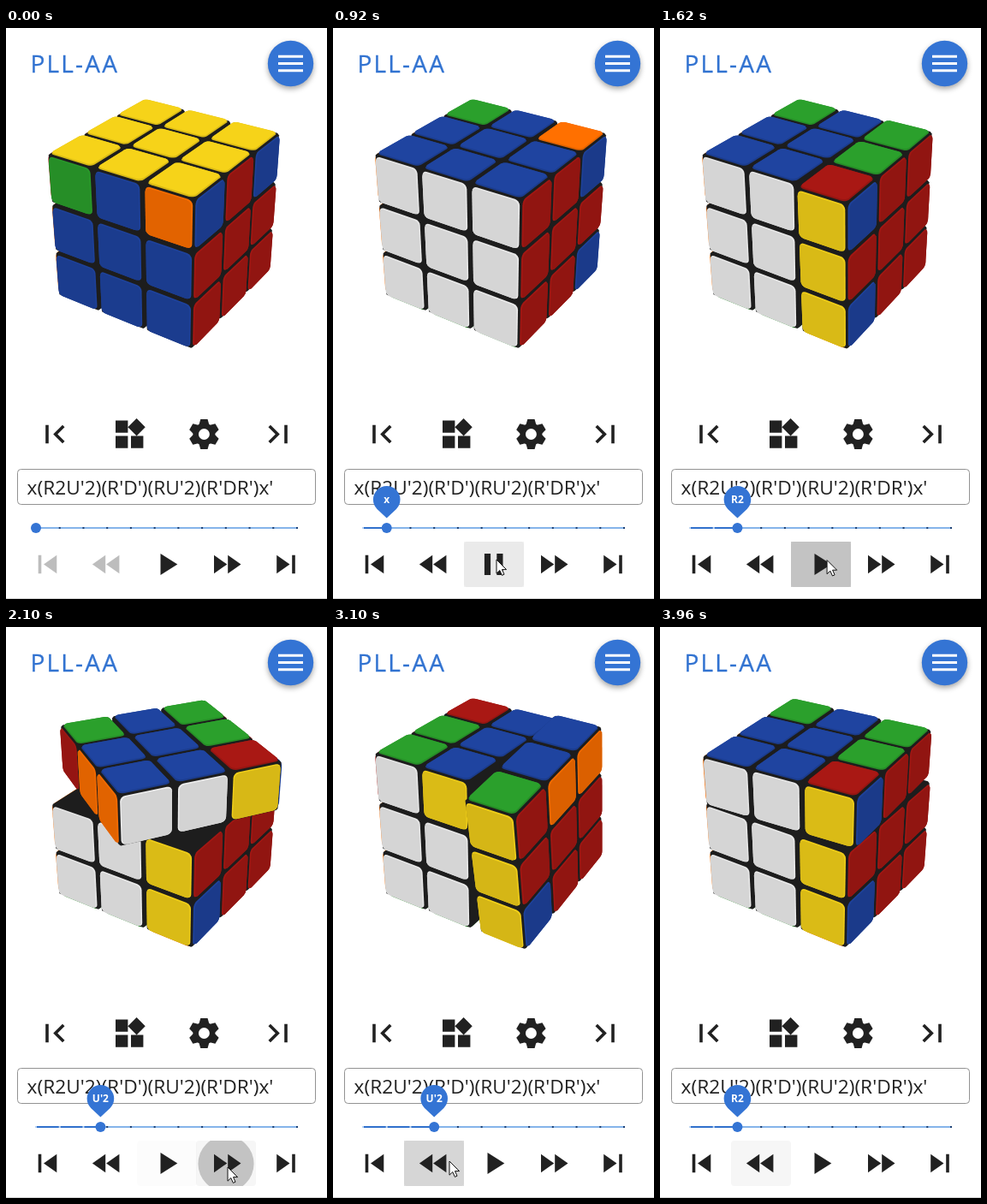
These frames come from a looping animation (375x667 px, 4.05 s). An HTML page with a canvas:

```html
<!DOCTYPE html>
<html lang="en">
<head>
<meta charset="utf-8">
<title>PLL-AA</title>
<style>
html, body { margin: 0; width: 100%; height: 100%; overflow: hidden; background: #fff; }
canvas, svg.ui { position: absolute; left: 0; top: 0; }
text { font-family: "Open Sans", "Noto Sans", sans-serif; }
.menu { filter: drop-shadow(0 3px 3px rgba(0, 0, 0, .35)); }
</style>
</head>
<body>
<canvas id="cube" width="375" height="430"></canvas>
<svg class="ui" width="375" height="667" viewBox="0 0 375 667" fill="#212121">
  <text x="28.5" y="52" font-size="28" letter-spacing="2.2" fill="#3273d1" stroke="#3273d1" stroke-width=".3">PLL-AA</text>
  <circle class="menu" cx="332.5" cy="41.5" r="26.7" fill="#3474d4"/>
  <path d="M318 33.2h29M318 41.5h29M318 49.8h29" stroke="#fff" stroke-width="3.1"/>

  <g transform="translate(57 474.5) scale(1.8) translate(-12 -12)">
    <path d="M18.4 16.6 13.8 12l4.6-4.6L17 6l-6 6 6 6zM6 6h2v12H6z"/>
  </g>
  <g transform="translate(144.2 474.6) scale(1.8) translate(-12 -12)">
    <path d="M13 13h8v8h-8zM3 13h8v8H3zM3 3h8v8H3zM16.66 1.7 22.3 7.34 16.66 13 11 7.34z"/>
  </g>
  <g id="gear" transform="translate(231.4 474.5) scale(1.8)">
    <circle r="5.4" fill="none" stroke="#212121" stroke-width="3.6"/>
  </g>
  <g transform="translate(318 474.5) scale(1.8) translate(-12 -12)">
    <path d="M5.6 7.4 10.2 12l-4.6 4.6L7 18l6-6-6-6zM16 6h2v12h-2z"/>
  </g>

  <rect x="13.5" y="515.5" width="348" height="41" rx="4" fill="none" stroke="#929292"/>
  <text x="24.6" y="544.7" font-size="22.7">x(R2U'2)(R'D')(RU'2)(R'DR')x'</text>

  <path d="M35 584H341" stroke="#85b4ea" stroke-width="2"/>
  <path id="track" stroke="#2f70cc" stroke-width="2"/>
  <g id="ticks"></g>
  <g id="thumb">
    <circle cy="584" r="6" fill="#3474d4"/>
    <g id="label">
      <path d="M0 572.5 -11.2 562A15.8 15.8 0 1 1 11.2 562Z" fill="#3474d4"/>
      <text id="name" y="554.8" font-size="12" font-weight="700" text-anchor="middle" fill="#fff"></text>
    </g>
  </g>

  <g id="glow"></g>
  <g class="back" transform="translate(48.5 626.5) scale(1.8) translate(-12 -12)">
    <path d="M6 6h2v12H6zM9.5 12l8.5 6V6z"/>
  </g>
  <g class="back" transform="translate(118 626.5) scale(1.8) translate(-12 -12)">
    <path d="M11 18V6l-8.5 6zM11.5 12l8.5 6V6z"/>
  </g>
  <g transform="translate(187.7 626.5) scale(1.8) translate(-12 -12)"><path id="play"/></g>
  <g transform="translate(257.4 626.5) scale(1.8) translate(-12 -12)">
    <path d="M4 18l8.5-6L4 6zM13 6v12l8.5-6z"/>
  </g>
  <g transform="translate(327 626.5) scale(1.8) translate(-12 -12)">
    <path d="M6 18l8.5-6L6 6zM16 6v12h2V6z"/>
  </g>
  <path d="M0 666.5H375" stroke="#d6d6d6"/>
  <path id="cursor" d="M0 0V16.2L3.8 12.6 6.4 18.4 9 17.2 6.5 11.6H11.6Z" fill="#fff" stroke="#111"/>
</svg>
<script>
const LOOP = 4050;
const $ = id => document.getElementById(id);
const clamp = v => Math.max(0, Math.min(1, v));
const mix = (a, b, k) => a + (b - a) * k;
const RAD = Math.PI / 180;

// ---- timeline ----
const easeOut = (t, start, length) => 1 - (1 - clamp((t - start) / length)) ** 3;
const QUARTER = 375, HALF = 750, SKIP = 2515;
const moves = [
  { axis: 0, turn: -90, all: true, at: t => easeOut(t, 575, QUARTER) },
  { axis: 0, turn: -180, at: t => easeOut(t, 1038, HALF) },
  { axis: 1, turn: 180, at: t => t < SKIP ? easeOut(t, 2012, HALF) : 1 - easeOut(t, 3410, HALF) },
  { axis: 0, turn: 90, at: t => easeOut(t, SKIP, QUARTER) - easeOut(t, 2895, QUARTER) }
];
const steps = [[0, 0], [575, 1], [1038, 2], [2012, 3], [2470, 4], [2880, 3], [3410, 2]];
const names = ["", "x", "R2", "U'2", "R'"];
const presses = [[545, 1], [1480, 1], [2018, 2], [2420, 2], [2850, 0], [3370, 0]];
const pointer = [
  [70, 226, 646], [390, 179, 610], [530, 179, 610], [610, 191, 621], [1600, 191, 621],
  [1950, 259, 631], [2500, 259, 631], [2630, 184, 628], [2720, 136, 624],
  [3520, 136, 624], [3720, 150, 668]
];

// cubic-bezier(.4, 0, .2, 1)
function standard(x) {
  let lo = 0, hi = 1;
  for (let i = 0; i < 18; i++) {
    const s = (lo + hi) / 2, r = 1 - s;
    if (1.2 * r * r * s + .6 * r * s * s + s ** 3 < x) lo = s; else hi = s;
  }
  return lo * lo * (3 - 2 * lo);
}

// ---- cube ----
const ctx = $("cube").getContext("2d");
const view = { az: 33 * RAD, el: 30 * RAD, dist: 10.4, focal: 988, x: 187.5, y: 219.6 };
const [sa, ca, se, ce] = [Math.sin(view.az), Math.cos(view.az), Math.sin(view.el), Math.cos(view.el)];
const eye = [sa * ce, se, ca * ce].map(v => v * view.dist);
const paint = {
  yellow: [246, 211, 25], blue: [31, 68, 160], red: [169, 24, 20],
  orange: [255, 112, 0], green: [43, 160, 44], white: [241, 241, 241]
};
const solved = [["orange", "red"], ["white", "yellow"], ["green", "blue"]];
// stickers of the three displaced corners, by position and axis
const swapped = {
  "-1,1,1": { 0: "red", 2: "green" },
  "1,1,1": { 0: "blue", 2: "orange" },
  "1,1,-1": { 0: "blue", 2: "red" }
};

const range = [-1, 0, 1];
const cubies = [];
for (const x of range) for (const y of range) for (const z of range) {
  const pos = [x, y, z], stickers = [];
  pos.forEach((v, axis) => {
    if (!v) return;
    const normal = [0, 0, 0];
    normal[axis] = v;
    const color = (swapped[pos] || {})[axis] || solved[axis][v > 0 ? 1 : 0];
    stickers.push({ normal, color });
  });
  cubies.push({ pos, stickers });
}

function rotate(v, axis, angle) {
  const i = (axis + 1) % 3, j = (axis + 2) % 3, out = [...v];
  const c = Math.cos(angle), s = Math.sin(angle);
  out[i] = c * v[i] - s * v[j];
  out[j] = s * v[i] + c * v[j];
  return out;
}
const add = (a, b, k = 1) => a.map((v, i) => v + b[i] * k);
const dot = (a, b) => a.reduce((sum, v, i) => sum + v * b[i], 0);

function project([x, y, z]) {
  const flat = x * sa + z * ca;
  const scale = view.focal / (view.dist - flat * ce - y * se);
  return [view.x + (x * ca - z * sa) * scale, view.y - (y * ce - flat * se) * scale];
}

function hull(points) {
  const sorted = [...points].sort((a, b) => a[0] - b[0] || a[1] - b[1]);
  const half = list => {
    const out = [];
    for (const p of list) {
      while (out.length > 1) {
        const [a, b] = out.slice(-2);
        if ((b[0] - a[0]) * (p[1] - a[1]) - (b[1] - a[1]) * (p[0] - a[0]) > 0) break;
        out.pop();
      }
      out.push(p);
    }
    return out.slice(0, -1);
  };
  return [...half(sorted), ...half(sorted.reverse())];
}

function fill(points, color) {
  ctx.fillStyle = color;
  ctx.beginPath();
  points.forEach(p => ctx.lineTo(...p));
  ctx.fill();
}

// half a cell, and the body that sits a little inside it
const CELL = 1 / 3, BODY = .318, BEVEL = .022;
const body = [];
for (const axis of [0, 1, 2]) for (const a of [-1, 1]) for (const b of [-1, 1]) for (const c of [-1, 1]) {
  const p = [a, b, c].map(v => v * (BODY - BEVEL));
  p[axis] = [a, b, c][axis] * BODY;
  body.push(p);
}

function outline(normal, half, height) {
  const axis = normal.findIndex(v => v), radius = .06, points = [];
  for (let k = 0; k < 20; k++) {
    const corner = Math.floor(k / 5);
    const a = (corner + (k % 5) / 4) * Math.PI / 2;
    const mid = (corner + .5) * Math.PI / 2;
    const p = normal.map(v => v * height);
    p[(axis + 1) % 3] = Math.sign(Math.cos(mid)) * (half - radius) + Math.cos(a) * radius;
    p[(axis + 2) % 3] = Math.sign(Math.sin(mid)) * (half - radius) + Math.sin(a) * radius;
    points.push(p);
  }
  return points;
}

function shade(color, n) {
  const light = .86 + .14 * n[1] + .025 * n[2];
  return `rgb(${paint[color].map(v => Math.min(255, Math.round(v * light)))})`;
}

// direction of the sticker rim that faces the eye
function rimNormal(n, gaze) {
  const flat = add(gaze, n, -dot(gaze, n));
  const length = Math.hypot(...flat);
  return flat.map(v => v / length);
}

function drawCubie({ pos, stickers, spin }) {
  const center = pos.map(v => v * 2 * CELL);
  const place = p => project(spin(add(center, p)));
  const parts = stickers.map(({ normal, color }) => {
    const n = spin(normal);
    const gaze = add(eye, spin(add(center, normal, CELL)), -1);
    const top = outline(normal, .29, CELL).map(place);
    const slab = hull([...outline(normal, .298, BODY).map(place), ...top]);
    return { n, color, top, slab, rim: rimNormal(n, gaze), front: dot(n, gaze) > 0 };
  });
  const side = s => fill(s.slab, shade(s.color, s.rim));
  parts.filter(s => !s.front).forEach(side);
  fill(hull(body.map(place)), "#1d1d1d");
  parts.filter(s => s.front).forEach(s => {
    side(s);
    fill(s.top, shade(s.color, s.n));
  });
}

function drawCube(t) {
  let state = cubies, active = null;
  const inLayer = (move, c) => move.all || c.pos[move.axis] === 1;
  for (const move of moves) {
    const q = move.at(t);
    if (q <= 0) break;
    if (q < 1) { active = { move, angle: move.turn * q * RAD }; break; }
    const turn = v => rotate(v, move.axis, move.turn * RAD).map(Math.round);
    state = state.map(c => inLayer(move, c) ? {
      pos: turn(c.pos),
      stickers: c.stickers.map(s => ({ normal: turn(s.normal), color: s.color }))
    } : c);
  }
  const items = state.map(c => {
    const moving = active && inLayer(active.move, c);
    const spin = moving ? v => rotate(v, active.move.axis, active.angle) : v => v;
    const gap = add(eye, spin(c.pos.map(v => v * 2 * CELL)), -1);
    return { ...c, spin, layer: moving ? 1 : 0, depth: dot(gap, gap) };
  });
  ctx.clearRect(0, 0, 375, 430);
  items.sort((a, b) => a.layer - b.layer || b.depth - a.depth).forEach(drawCubie);
}

// ---- controls ----
const LEFT = 35, STEP = 305 / 11;
for (let i = 0; i < 6; i++) {
  $("gear").innerHTML += `<path d="M-3.4-5.8-2.3-9.7H2.3L3.4-5.8Z" transform="rotate(${i * 60})"/>`;
}
for (let i = 0; i < 12; i++) {
  $("ticks").innerHTML += `<rect x="${LEFT - 1 + i * STEP}" y="583" width="2" height="2"/>`;
}
for (const x of [83, 153, 222]) {
  $("glow").innerHTML += `<svg x="${x}" y="600" width="70" height="53">
    <rect width="70" height="53" rx="4"/><circle cx="35" cy="27"/></svg>`;
}
const ticks = [...$("ticks").children], buttons = [...$("glow").children];
const backIcons = document.querySelectorAll(".back");

function drawSlider(t) {
  const i = steps.findLastIndex(s => s[0] <= t);
  const [start, target] = steps[i];
  const from = i ? steps[i - 1][1] : 0;
  const value = mix(from, target, standard(clamp((t - start - 20) / 150)));
  const x = LEFT + value * STEP;
  $("thumb").setAttribute("transform", `translate(${x})`);
  $("track").setAttribute("d", `M${LEFT} 584H${x}`);
  $("name").textContent = names[target];
  const size = standard(clamp((t - 575) / 100));
  $("label").setAttribute("transform", `translate(0 ${573 * (1 - size)}) scale(${size})`);
  ticks.forEach((tick, k) => tick.setAttribute("fill", k < value ? "#b9d3f3" : "#1b3f73"));
}

function drawButtons(t) {
  const last = presses.findLastIndex(p => p[0] <= t);
  buttons.forEach((button, b) => {
    const [rect, ring] = button.children;
    let base = 0, ripple = 0;
    if (last >= 0) {
      const [start, id] = presses[last], age = t - start;
      if (id === b) {
        base = .04;
        ripple = .235 * (1 - clamp((age - 145) / 300));
        ring.setAttribute("r", Math.min(46, 6 + .32 * age));
      } else if (last && presses[last - 1][1] === b) {
        base = .04 * (1 - clamp(age / 120));
      }
    }
    rect.setAttribute("fill-opacity", base);
    ring.setAttribute("fill-opacity", ripple);
  });
  const playing = t >= 575 && t < 1480;
  $("play").setAttribute("d", playing ? "M6 5h4v14H6zM14 5h4v14h-4z" : "M8 5v14l11-7z");
  backIcons.forEach(icon => icon.setAttribute("fill", t < 575 ? "#bdbdbd" : "#212121"));
}

function drawCursor(t) {
  const i = pointer.findLastIndex(p => p[0] <= t);
  const shown = i >= 0 && i < pointer.length - 1;
  $("cursor").setAttribute("visibility", shown ? "visible" : "hidden");
  if (!shown) return;
  const [a, b] = [pointer[i], pointer[i + 1]];
  const k = (t - a[0]) / (b[0] - a[0]);
  $("cursor").setAttribute("transform", `translate(${mix(a[1], b[1], k)} ${mix(a[2], b[2], k)})`);
}

const begin = performance.now();
function frame() {
  const t = (performance.now() - begin) % LOOP;
  drawCube(t);
  drawSlider(t);
  drawButtons(t);
  drawCursor(t);
  requestAnimationFrame(frame);
}
frame();
</script>
</body>
</html>
```
